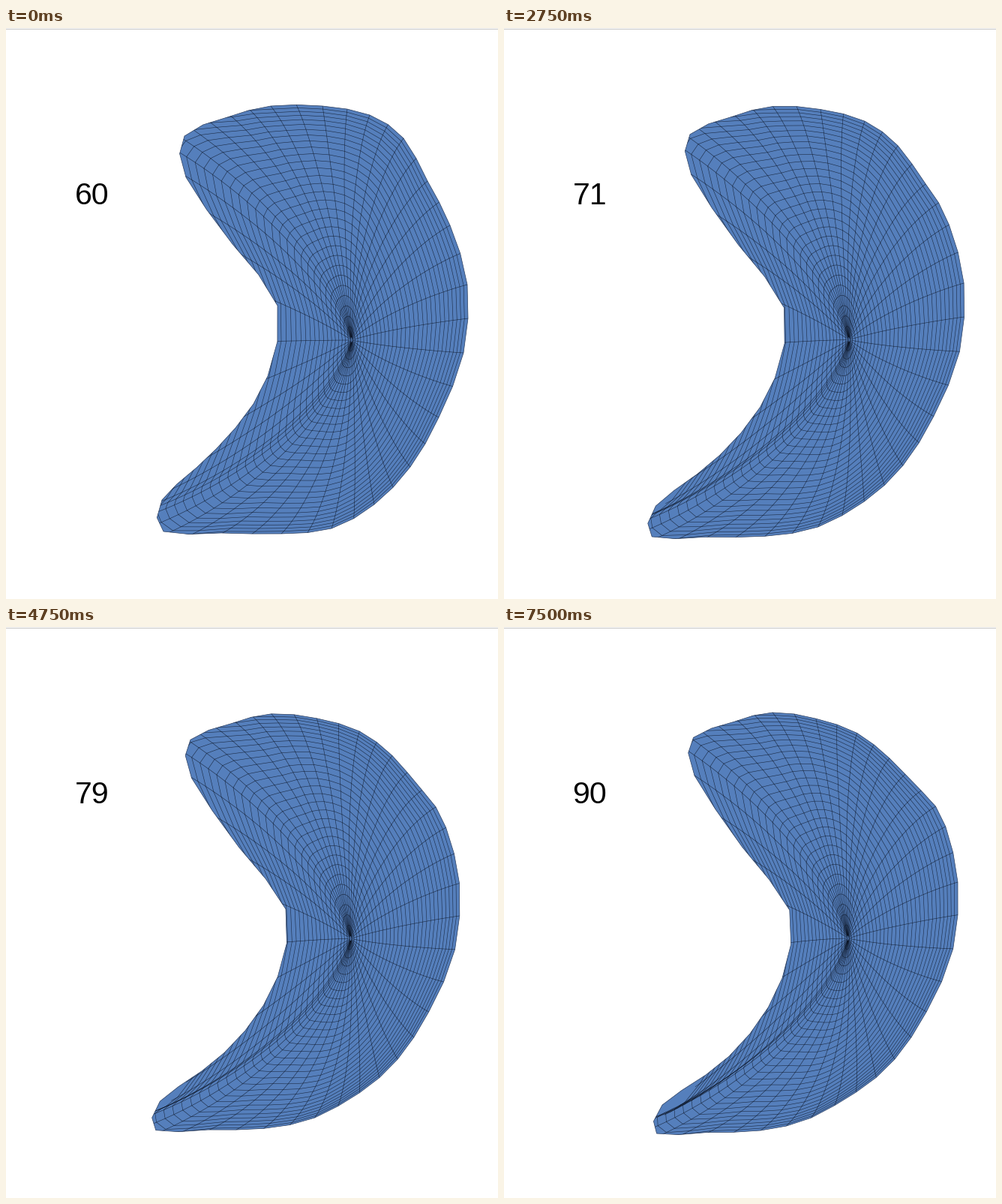
Write a matplotlib script that moves like this. It is 656 px wide and 761 px high and loops after 7.75 s.

```python
import numpy as np
import matplotlib.pyplot as plt
from matplotlib.animation import FuncAnimation
from matplotlib.collections import LineCollection
from matplotlib.patches import Polygon

W, H, DPI = 656, 761, 64
PX = 72 / DPI                      # one pixel in points
FIRST, FRAMES, STEP = 60, 31, 250
RINGS, RAYS = 30, 48
TILT = 1.3                         # how far the cap curves away, in radians

# Key points of the starting outline, clockwise from the top.
START = [(353, 104), (422, 104), (485, 116), (530, 147), (562, 204),
         (592, 263), (615, 342), (610, 433), (577, 519), (539, 585),
         (491, 635), (434, 667), (367, 674), (287, 673), (210, 671),
         (208, 629), (254, 586), (306, 533), (349, 464), (362, 370),
         (302, 288), (240, 199), (238, 144), (295, 119)]
# Total shift over the loop at evenly spaced places on the outline.
DRIFT = [(5, 10), (-11, 22), (-16, 28), (-2, 7), (-10, -2), (-12, -5),
         (-18, -9), (-23, -16), (-25, -3), (-11, 2), (3, 8), (20, 11),
         (22, 4), (17, 8), (14, -1), (14, 6)]


def smooth(points):
    """Closed Catmull-Rom curve through the points, one sample per ray."""
    p = np.array(points, float)
    i, t = np.divmod(np.arange(RAYS) * len(p) / RAYS, 1)
    i, t = i.astype(int), t[:, None]
    a, b, c, d = (p[(i + k) % len(p)] for k in (-1, 0, 1, 2))
    return b + t / 2 * (c - a + t * (2 * a - 5 * b + 4 * c - d
                                     + t * (3 * (b - c) + d - a)))


def bump(center, width):
    """Soft weight around one ray."""
    return np.exp(-((np.arange(RAYS) - center) / width) ** 2)[:, None]


def ellipse():
    """Tall ellipse, leaning left, that the rings tend to at the pole."""
    angle = np.radians(np.interp(np.arange(RAYS),
                                 [-6, 1, 13.6, 24, 32, 37, 42, 49],
                                 [130, 90, 0, -90, -130, -180, -230, -270]))
    up = np.sin(angle)
    lean = np.where(up > 0, 45, 25) * np.abs(up)
    height = np.where(up > 0, 312, 250)
    return np.column_stack([75 * np.cos(angle) - lean, -height * up])


BASE, SHIFT, INNER = smooth(START), smooth(DRIFT), ellipse()
TIP = bump(27, 6)
FOLD = 1 + 0.8 * bump(37, 5)       # the hollow side continues out of sight


def pole_at(t):
    return np.array([461 - 2 * t, 416 - t])


def outline(t):
    """Drift, one breath in and out, and an early stretch of the lower tip."""
    breath = np.sin(2 * np.pi * t)
    stretch = 12.2 * t * (1 - t) ** 4
    shape = BASE + SHIFT * t * (3 - t) / 2
    shape[:, 0] += 4 * breath
    shape[:, 1] += 0.019 * breath * (shape[:, 1] - pole_at(t)[1])
    return shape + TIP * stretch * np.array([-18, 2])


def mesh(t, edge):
    """Grid of points, rings by rays, from the pole outwards."""
    pole = pole_at(t)
    outer = (edge - pole) * FOLD
    s = np.linspace(0.01, 1, RINGS + 1)[:, None, None]
    radius = np.sin(TILT * s) / np.sin(TILT)
    return pole + radius * ((1 - s) * INNER + s * outer)


fig = plt.figure(figsize=(W / DPI, H / DPI), dpi=DPI, facecolor="white")
ax = fig.add_axes([0, 0, 1, 1])
ax.set(xlim=(0, W), ylim=(H, 0))
ax.axis("off")

ax.plot([0, W], [0.5, 0.5], color="#c4c4c4", lw=PX)
body = ax.add_patch(Polygon(BASE, closed=True, fc="#557fbc",
                            ec="#2a3d5e", lw=0.7 * PX))
wires = ax.add_collection(LineCollection([], colors=[(0.04, 0.07, 0.13, 0.75)],
                                         linewidths=0.6 * PX))
label = ax.text(91.5, 235, "", family="Liberation Sans", size=41 * PX,
                color="black", ha="left", va="baseline")


def draw(frame):
    t = frame / (FRAMES - 1)
    edge = outline(t)
    grid = mesh(t, edge)
    rings = [np.vstack([ring, ring[:1]]) for ring in grid[:-1]]
    rays = list(grid.swapaxes(0, 1))
    body.set_xy(edge)
    wires.set_segments(rings + rays)
    wires.set_clip_path(body)
    label.set_text(str(FIRST + frame))
    return body, wires, label


anim = FuncAnimation(fig, draw, frames=FRAMES, interval=STEP,
                     repeat=True, repeat_delay=0, blit=False)
plt.show()
```
